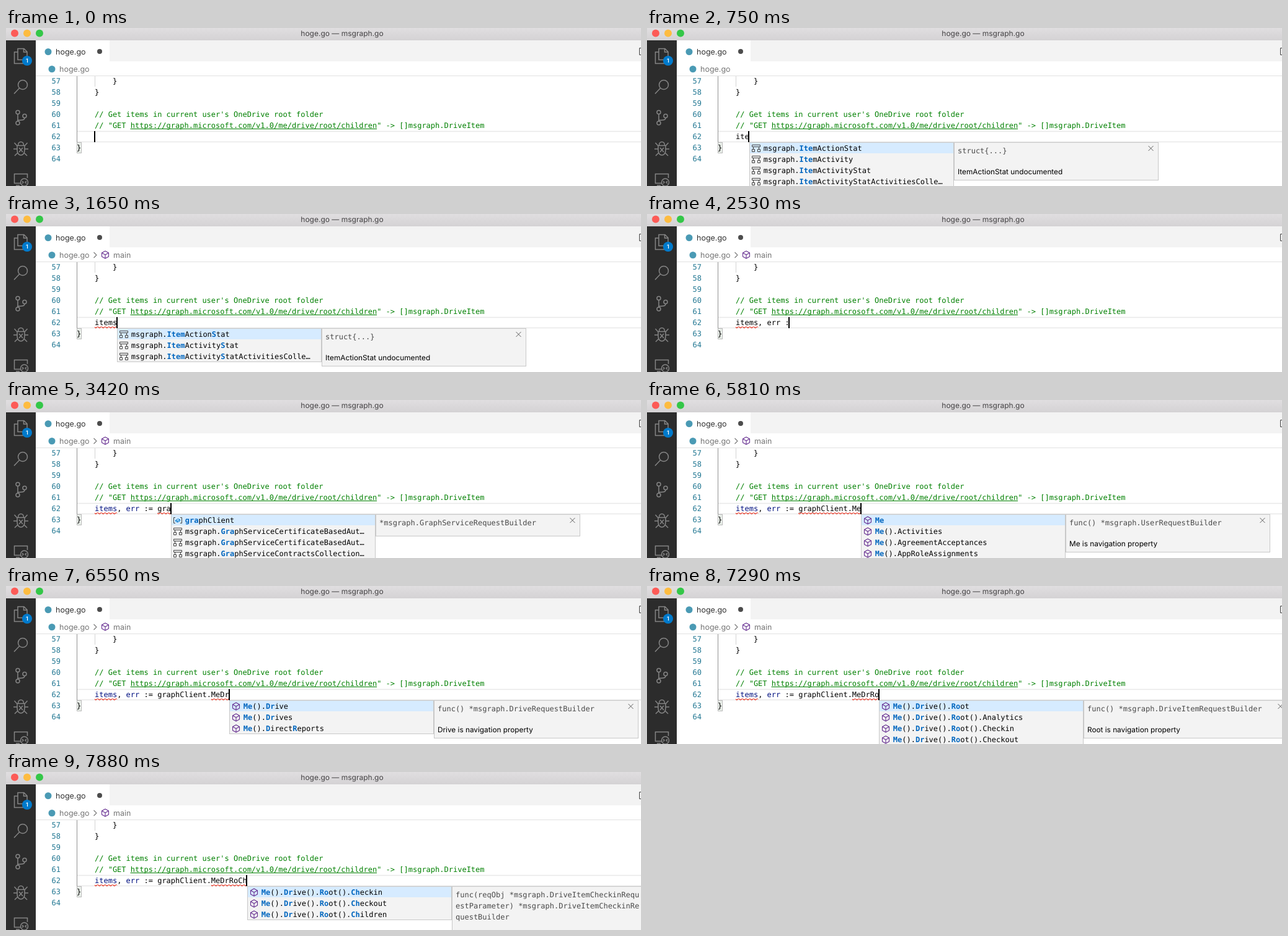
These frames come from a looping animation (1024 by 256 pixels, 8000 ms). An HTML page:

```html
<!DOCTYPE html>
<html lang="en">
<head>
<meta charset="utf-8">
<title>hoge.go</title>
<style>
  html, body { margin: 0; width: 100%; height: 100%; overflow: hidden; background: #fff; }
  svg { display: block; }
  text { white-space: pre; text-rendering: geometricPrecision; }
  .mono { font: 12px "DejaVu Sans Mono", monospace; }
  .ui { font: 12.5px Inter, sans-serif; }
  .doc { font: 11.8px Inter, sans-serif; }
  .num { fill: #237893; }
  .comment { fill: #008000; }
  .decl { fill: #001080; }
  .hit { fill: #0066bf; font-weight: bold; }
  .sig { fill: #4a4a4a; }
  .panel { fill: #f3f3f3; stroke: #c8c8c8; }
  .bar { fill: none; stroke: #858585; stroke-width: 1.5; }
  .cube { fill: none; stroke: #652d90; stroke-width: 1.1; stroke-linejoin: round; }
</style>
</head>
<body>
<svg width="1024" height="256" viewBox="0 0 1024 256">
  <defs>
    <linearGradient id="title" x2="0" y2="1">
      <stop offset="0" stop-color="#e0dee0"/><stop offset="1" stop-color="#d4d2d4"/>
    </linearGradient>
    <pattern id="wave" width="6" height="3" patternUnits="userSpaceOnUse" y="2">
      <path fill="#e51400" d="M5.5 0 2.5 3H1.1L4.1 0ZM4 0 6 2V.6L5.4 0ZM0 2 1 3H2.4L0 .6Z"/>
    </pattern>
    <g id="cube" class="cube">
      <path d="M0-6 5.5-3V3L0 6-5.5 3V-3ZM-5.5-3 0 0 5.5-3M0 0V6"/>
    </g>
    <g id="struct" fill="none" stroke="#424242">
      <path d="M-6.5-5.5h13v3h-13ZM-6.5 1.5h4v4h-4ZM2.5 1.5h4v4h-4ZM-4.5-2.5v4M4.5-2.5v4"/>
    </g>
    <g id="var" fill="none" stroke="#424242">
      <path d="M-4-4.5h-2.5v9H-4M4-4.5h2.5v9H4"/>
      <path stroke="#007acc" d="M-3.5 0 .5-2.5 3.5-1V1L-.5 3-3.5 1.5ZM-3.5 0-.5 1 3.5-1M-.5 1v2"/>
    </g>
  </defs>

  <rect width="1024" height="256" fill="#fff"/>

  <!-- code -->
  <path d="M114 167.5H1024M114 184.5H1024" stroke="#e8e8e8" stroke-width="1.5"/>
  <path d="M114.5 77V185" stroke="#939393"/>
  <path d="M143.5 77V95" stroke="#d3d3d3"/>
  <rect x="114.5" y="185.5" width="7" height="17" fill="#eaf0ea" stroke="#b9b9b9"/>
  <g id="code" class="mono"></g>
  <path d="M200.5 163.5H598" stroke="#008000"/>
  <g id="live"></g>

  <!-- breadcrumb and tabs -->
  <rect x="48" y="54" width="976" height="23" fill="#fff"/>
  <path d="M48 77.5H1024" stroke="#e2e2e2"/>
  <rect x="48" y="20" width="976" height="34" fill="#f3f3f3"/>
  <rect x="48" y="20" width="119" height="35" fill="#fff"/>
  <circle cx="68" cy="38.5" r="5.5" fill="#4a9ab4"/>
  <text class="ui" x="80" y="43" fill="#333">hoge.go</text>
  <circle cx="151" cy="38" r="4" fill="#4c4c4c"/>
  <path d="M1026 32.5H1021.5V43.5H1026" fill="none" stroke="#424242"/>
  <circle cx="74" cy="66.5" r="5.5" fill="#4a9ab4"/>
  <text class="ui" x="86" y="71" fill="#767676">hoge.go</text>
  <g id="crumb">
    <path d="M141.5 62 146 66.5 141.5 71" fill="none" stroke="#767676" stroke-width="1.1"/>
    <use href="#cube" x="160" y="66"/>
    <text class="ui" x="173" y="71" fill="#767676">main</text>
  </g>

  <!-- activity bar -->
  <rect y="20" width="48" height="236" fill="#2c2c2c"/>
  <g class="bar">
    <path d="M19 33.5H29L34 38.5V51.5H19ZM28.5 33.5V39H34M19 39H13.5V57.5H27.5V52"/>
    <circle cx="27" cy="92" r="7.5"/><path d="M21.5 97.5 13 106.5"/>
    <circle cx="19" cy="136.500" r="3"/><circle cx="19" cy="154" r="3"/><circle cx="30" cy="142.500" r="3"/>
    <path d="M19 139.500V151M30 145.500C30 149 27 149.500 19 149.500"/>
    <path d="M18 190.500H30V198C30 208.500 18 208.500 18 198ZM19.500 190C19.500 182.500 28.500 182.500 28.500 190M18 196H12M30 196H36M18 191 13.500 186M30 191 34.500 186M19 202 14 207M29 202 34 207M21 194 27 201M27 194 21 201"/>
    <path d="M23 251.500H13.500V236.500H34.500V243M16 255H22"/>
    <circle cx="29.500" cy="250" r="6"/><path d="M26 248 28 250 26 252M33 248 31 250 33 252"/>
  </g>
  <circle cx="34" cy="53" r="8" fill="#007acc"/>
  <text x="34" y="56.300" text-anchor="middle" fill="#fff" style="font:600 9px Inter,sans-serif">1</text>

  <!-- title bar -->
  <rect width="1024" height="20" fill="url(#title)"/>
  <circle cx="14" cy="8.500" r="6" fill="#fc5b57"/>
  <circle cx="34" cy="8.500" r="6" fill="#fdbc40"/>
  <circle cx="54" cy="8.500" r="6" fill="#34c748"/>
  <text x="542" y="13" text-anchor="middle" fill="#454345" style="font:12px Inter,sans-serif">hoge.go — msgraph.go</text>
</svg>

<script>
const $ = id => document.getElementById(id);
const LOOP = 8000, X0 = 143, CELL = 7.2246, LINE = 18;
const col = n => X0 + n * CELL;
const mono = (x, y, s, cls = '') => `<text class="mono ${cls}" x="${x}" y="${y}">${s}</text>`;

const lines = [
  [4, '}'], [0, '}'], [0, ''],
  [0, "// Get items in current user's OneDrive root folder"],
  [0, '// "GET https://graph.microsoft.com/v1.0/me/drive/root/children" -&gt; []msgraph.DriveItem'],
  [0, ''], [-4, '}'], [0, '']
];
$('code').innerHTML = lines.map(([c, s], i) => {
  const y = 90 + i * LINE;
  return mono(73.6, y, 57 + i, 'num') + mono(col(c), y, s, s[0] === '/' ? 'comment' : '');
}).join('');

// Completion lists: stars mark the matched letters
const nav = (type, name) => ({ sig: [`func() *msgraph.${type}RequestBuilder`], doc: `${name} is navigation property` });
const struct = name => ({ icon: 'struct', sig: ['struct{...}'], doc: `${name} undocumented` });
const itemRows = m => {
  const mark = 'Item'.slice(0, m), rest = 'Item'.slice(m);
  return ['ActionStat', 'Activity', 'ActivityStat', 'ActivityStatActivitiesColle…']
    .map(s => `msgraph.*${mark}*${rest}${s}`);
};
const items = m => ({ ...struct('ItemActionStat'), rows: itemRows(m), long: true });
const errs = m => {
  const mark = 'Error'.slice(0, m), rest = 'Error'.slice(m);
  return { ...struct('ErrorDetails'), rows: ['Details', 'Object', 'Response'].map(s => `msgraph.*${mark}*${rest}${s}`) };
};
const graph = m => {
  const mark = 'Graph'.slice(0, m), rest = 'Graph'.slice(m);
  return {
    icon: 'struct', first: 'var', long: true, sig: ['*msgraph.GraphServiceRequestBuilder'],
    rows: [`*${mark.toLowerCase()}*${rest}Client`, ...['CertificateBasedAut…', 'CertificateBasedAut…', 'ContractsCollection…']
      .map(s => `msgraph.*${mark}*${rest}Service${s}`)]
  };
};
const checkin = {
  rows: ['eckin', 'eckout', 'ildren'].map(s => `*Me*().*Dr*ive().*Ro*ot().*Ch*${s}`),
  sig: ['func(reqObj *msgraph.DriveItemCheckinRequ', 'estParameter) *msgraph.DriveItemCheckinRe', 'questBuilder']
};
const lists = {
  i: items(1), it: items(2), ite: items(3), item: items(4),
  items: {
    ...struct('ItemActionStat'),
    rows: ['Action*S*tat', 'Activity*S*tat', 'Activity*S*tatActivitiesColle…'].map(s => `msgraph.*Item*${s}`)
  },
  e: errs(1), er: errs(2), err: errs(3),
  g: graph(1), gr: graph(2), gra: graph(3),
  dot: {
    ...nav('AppCatalogs', 'AppCatalogs'), long: true, scroll: true,
    rows: ['AppCatalogs', 'AuditLogs', 'CertificateBasedAuthConfiguration', 'Communications']
  },
  M: { ...nav('User', 'Me'), long: true, rows: ['*M*e', '*M*e().Activities', '*M*e().AgreementAcceptances', '*M*e().AppRoleAssignments'] },
  Me: { ...nav('User', 'Me'), long: true, rows: ['*Me*', '*Me*().Activities', '*Me*().AgreementAcceptances', '*Me*().AppRoleAssignments'] },
  MeD: { ...nav('Drive', 'Drive'), long: true, rows: ['*Me*().*D*rive', '*Me*().*D*rives', '*Me*().*D*irectReports', '*Me*().Owned*D*evices'] },
  MeDr: { ...nav('Drive', 'Drive'), rows: ['*Me*().*Dr*ive', '*Me*().*Dr*ives', '*Me*().*D*irect*R*eports'] },
  MeDrR: { ...nav('DriveItem', 'Root'), rows: ['*Me*().*Dr*ive().*R*oot', '*Me*().*D*i*r*ect*R*eports'] },
  MeDrRo: { ...nav('DriveItem', 'Root'), long: true, rows: ['', '().Analytics', '().Checkin', '().Checkout'].map(s => `*Me*().*Dr*ive().*Ro*ot${s}`) },
  MeDrRoC: { ...checkin, rows: checkin.rows.map(s => s.replace('*Ch*', '*C*h')) },
  MeDrRoCh: checkin
};

// Squiggles are [first column, last column]; BRACE sits one row lower
const ITEMS = [0, 5], BRACE = 'brace', CALL = 'items, err := graphClient.';
const on = { main: true, waves: [ITEMS] };
const chain = (s, from = 26) => ({ text: CALL + s, list: s, main: true, waves: [ITEMS, [from, 26 + s.length]] });
const steps = [
  [0, { text: '' }],
  [450, { text: 'i' }],
  [600, { text: 'it', list: 'it' }],
  [750, { text: 'ite', list: 'ite' }],
  [900, { text: 'item', list: 'item', main: true, waves: [[0, 4]] }],
  [1350, { text: 'item', list: 'item', main: true, waves: [[0, 4]], blink: true }],
  [1650, { ...on, text: 'items', list: 'items' }],
  [1800, { ...on, text: 'items,' }],
  [1950, { ...on, text: 'items, ' }],
  [2100, { ...on, text: 'items, e', list: 'e' }],
  [2240, { ...on, text: 'items, er', list: 'er' }],
  [2390, { ...on, text: 'items, err', list: 'err' }],
  [2530, { ...on, text: 'items, err :' }],
  [2830, { ...on, text: 'items, err :=' }],
  [2980, { main: true, text: 'items, err := ', waves: [BRACE] }],
  [3130, { main: true, text: 'items, err := g', list: 'g', waves: [BRACE] }],
  [3270, { main: true, text: 'items, err := gr', list: 'gr', waves: [ITEMS, [14, 16]] }],
  [3420, { main: true, text: 'items, err := gra', list: 'gra', waves: [ITEMS, [14, 17]] }],
  [3870, { main: true, text: 'items, err := graphClient', waves: [ITEMS, [14, 25]] }],
  [4470, { main: true, text: CALL }],
  [4620, { main: true, text: CALL, list: 'dot', waves: [BRACE] }],
  [4920, { main: true, text: CALL, list: 'dot', waves: [BRACE], blink: true }],
  [5060, { text: CALL, list: 'dot', waves: [BRACE], blink: true }],
  [5360, { text: CALL + 'M', list: 'M' }],
  [5660, { ...on, text: CALL + 'M', list: 'M' }],
  [5810, chain('Me', 14)],
  [6260, { ...chain('MeD', 14), bare: true }],
  [6400, chain('MeD')],
  [6550, chain('MeDr')],
  [7000, chain('MeDrR')],
  [7290, chain('MeDrRo')],
  [7440, { ...chain('MeDrRoC'), bare: true }],
  [7580, chain('MeDrRoC')],
  [7880, chain('MeDrRoCh')]
];

const wave = w => {
  const [a, b, y] = w === BRACE ? [-4, -3, 200] : [...w, 182];
  return `<g transform="translate(${col(a)} ${y - 2})"><rect y="2" width="${(b - a) * CELL}" height="3" fill="url(#wave)"/></g>`;
};
const label = s => s.split('*').map((p, i) => i % 2 ? `<tspan class="hit">${p}</tspan>` : p).join('');
const panel = (x, w, h) => `<rect class="panel" x="${x + .5}" y="185.5" width="${w - 1}" height="${h}"/>`;

function details({ sig, doc }, x) {
  const h = doc ? 61 : sig.length > 1 ? 98 : 35, c = x + 317.5;
  return panel(x, 330, h) +
    sig.map((s, i) => mono(x + 6, 203 + i * LINE, s, 'sig')).join('') +
    (doc ? `<text class="doc" x="${x + 6}" y="237">${doc}</text>` : '') +
    `<path d="M${c - 4} 191l8 8m0-8l-8 8" stroke="#616161"/>`;
}

function popup(list, x, bare) {
  const { rows, icon = 'cube', first = icon, long, scroll } = list;
  return (bare ? '' : details(list, x + 330)) +
    panel(x, 330, long ? 90 : rows.length * LINE) +
    `<rect x="${x + 1}" y="186" width="328" height="17" fill="#d6ebff"/>` +
    rows.map((s, i) =>
      `<use href="#${i ? icon : first}" x="${x + 11}" y="${195 + i * LINE}"/>` +
      mono(x + 22.8, 199 + i * LINE, label(s))).join('') +
    (scroll ? `<rect x="${x + 319}" y="186" width="10" height="60" fill="#646464" opacity=".4"/>` : '');
}

function draw({ text, list, main, waves = [], blink, bare }) {
  const x = col(text.length);
  const code = text.includes(':=')
    ? text.replace(/items|err/g, '<tspan class="decl">$&</tspan>') : text;
  $('crumb').style.display = main ? '' : 'none';
  $('live').innerHTML = mono(X0, 180, code) + waves.map(wave).join('') +
    (list ? popup(lists[list], Math.round(x), bare) : '') +
    (blink ? '' : `<rect x="${Math.floor(x - .7)}" y="167" width="2" height="18"/>`);
}

let shown;
function tick() {
  const t = performance.now() % LOOP;
  const step = steps.findLast(s => s[0] <= t);
  if (step !== shown) draw((shown = step)[1]);
  requestAnimationFrame(tick);
}
tick();
</script>
</body>
</html>
```
